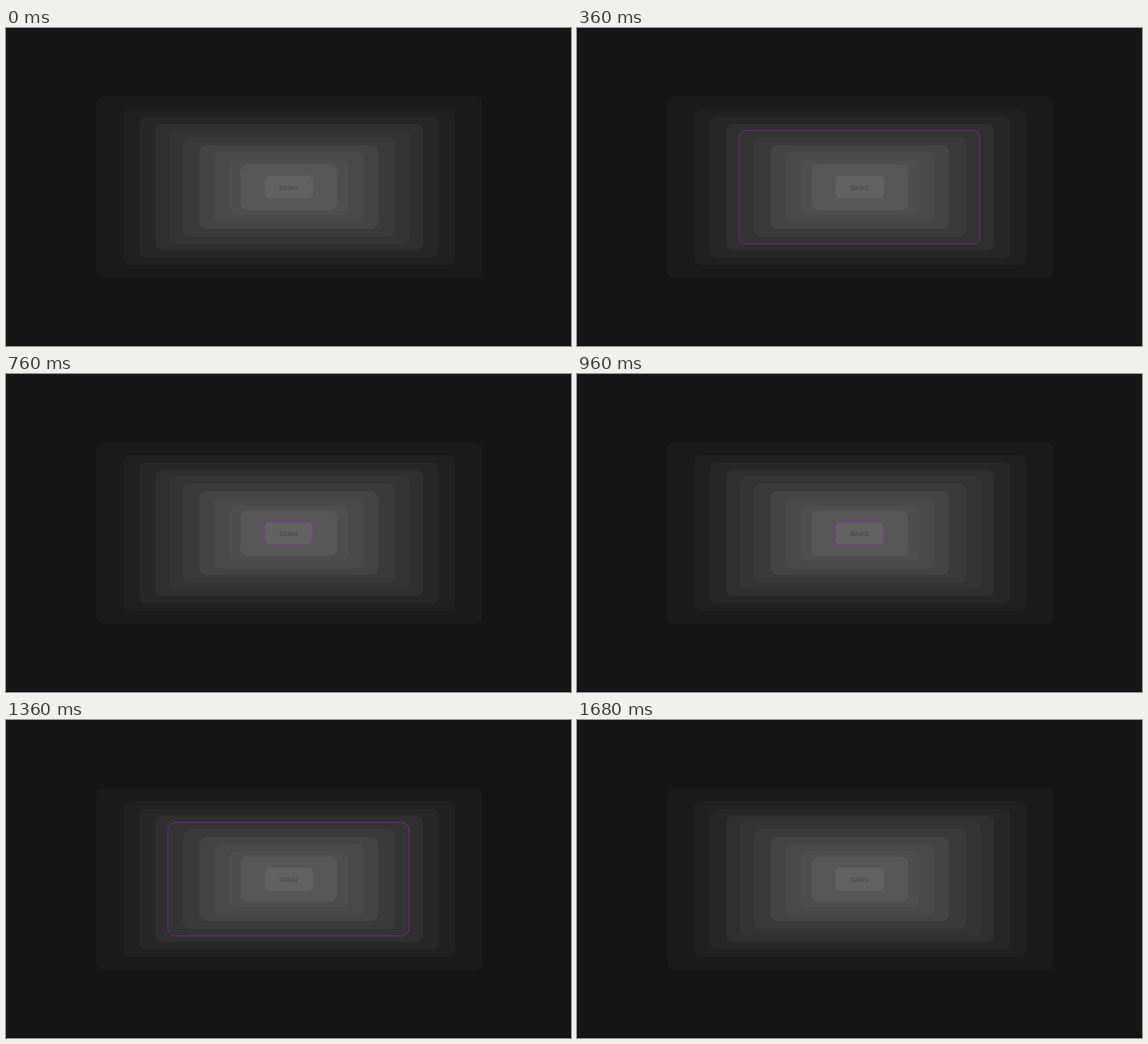
An HTML page with a canvas that plays this animation: 998 by 561 pixels, repeating every 1.72 s.

```html
<!DOCTYPE html>
<html lang="en">
<head>
<meta charset="utf-8">
<title>Pulsing frames</title>
<style>
  html, body { margin: 0; width: 100%; height: 100%; overflow: hidden; background: #151515; }
  canvas { display: block; }
</style>
</head>
<body>
<canvas id="stage" width="998" height="561"></canvas>
<script>
const ctx = document.getElementById('stage').getContext('2d');
const LOOP = 1720, TICK = 40, STEP = 200 / 3, DELAY = 8;
const ASPECT = 0.47, CENTER_Y = 280.7;

// Outermost to innermost
const widths = [682, 586, 530, 474, 426, 375, 315, 266, 210, 171, 85.5];
const grays = [27, 32, 39, 47, 52, 58, 68, 73, 78, 87, 98];

function panel(width, centerX) {
  const height = width * ASPECT;
  ctx.beginPath();
  ctx.roundRect(centerX - width / 2, CENTER_Y - height / 2, width, height, width < 100 ? 9 : 13);
}

function draw(time) {
  ctx.fillStyle = '#151515';
  ctx.fillRect(0, 0, 998, 561);
  ctx.fillStyle = '#050505';
  ctx.fillRect(0, 560, 998, 1);

  widths.forEach((width, i) => {
    const gray = grays[i];
    ctx.fillStyle = `rgb(${gray},${gray},${gray})`;
    panel(width, i < 6 ? 500.2 : 499.5);
    ctx.fill();
  });

  ctx.fillStyle = '#4d4d4d';
  ctx.font = 'bold 11.5px Roboto, sans-serif';
  ctx.textAlign = 'center';
  ctx.textBaseline = 'alphabetic';
  ctx.fillText('GAWU', 499, 286);

  // The outline runs inward, pauses unseen, then runs back out
  const tick = Math.floor(time / TICK) * TICK;
  const step = Math.floor((tick - DELAY) / STEP);
  const active = Math.min(step, 25 - step);
  if (active >= 1 && active <= widths.length) {
    ctx.strokeStyle = '#9c1ac4';
    ctx.lineWidth = 1;
    panel(widths[active - 1], 498.9);
    ctx.stroke();
  }
}

function frame() {
  draw(performance.now() % LOOP);
  requestAnimationFrame(frame);
}
frame();
</script>
</body>
</html>
```
